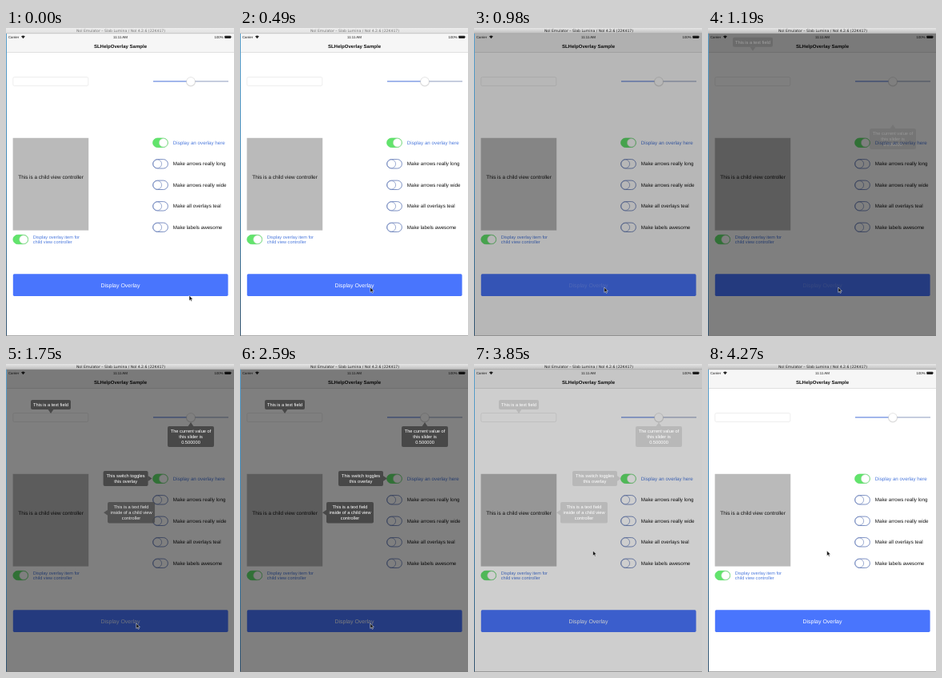
An HTML page for the animation above (4.34 s loop, 285 px wide and 386 px high).

```html
<!DOCTYPE html>
<html lang="en">
<head>
<meta charset="utf-8">
<title>Help overlay demo</title>
<style>
html, body { margin: 0; width: 100%; height: 100%; overflow: hidden; background: #fff; }
svg { display: block; width: 100vw; height: 100vh; }
text { font-family: "Liberation Sans", Arial, sans-serif; text-rendering: geometricPrecision; }
</style>
</head>
<body>
<svg id="stage" viewBox="0 0 285 386">
  <defs>
    <linearGradient id="bar" x2="0" y2="1">
      <stop offset="0" stop-color="#e6e6e6"/><stop offset="1" stop-color="#bdbdbd"/>
    </linearGradient>
    <linearGradient id="desk" x2="0" y2="1">
      <stop offset="0" stop-color="#5aa0cc"/><stop offset=".5" stop-color="#3f86b4"/><stop offset="1" stop-color="#33536e"/>
    </linearGradient>
  </defs>
  <g id="screen"></g>
  <g id="overlay"><rect x="1" y="7" width="284" height="379" opacity=".5"/></g>
  <g id="chrome"></g>
  <path id="cursor" d="M0 0V6.4L1.5 5.1L2.5 7.3L3.6 6.8L2.6 4.7L4.5 4.6Z" fill="#111" stroke="#fff" stroke-width=".5"/>
</svg>
<script>
const LOOP = 4340, STEP = 70;
const $ = id => document.getElementById(id);
const screen = $('screen'), overlay = $('overlay'), chrome = $('chrome');

function add(parent, tag, attrs, content) {
  const el = document.createElementNS('http://www.w3.org/2000/svg', tag);
  for (const k in attrs) el.setAttribute(k, attrs[k]);
  if (content) el.textContent = content;
  return parent.appendChild(el);
}
const rect = (p, x, y, width, height, fill, more) => add(p, 'rect', { x, y, width, height, fill, ...more });
const text = (p, s, x, y, size, fill, anchor = 'start', more) =>
  add(p, 'text', { x, y, 'font-size': size, fill, 'text-anchor': anchor, ...more }, s);

function toggle(x, y, on) {
  const g = add(screen, 'g', { transform: `translate(${x} ${y})` });
  const edge = on ? '#58dc66' : '#5b74b4';
  rect(g, -9.4, -5.7, 18.8, 11.4, on ? '#62e46c' : '#fff', { rx: 5.7, stroke: edge, 'stroke-width': .8 });
  add(g, 'circle', { cx: on ? 3.7 : -3.7, r: 5.3, fill: '#fff', stroke: on ? '#b5d8b8' : edge, 'stroke-width': .6 });
}

// Static app screen
rect(screen, 0, 0, 285, 386, '#fff');
rect(screen, 0, 7, 285, 23.4, '#f6f6f6');
rect(screen, 0, 30.2, 285, .5, '#c4c4c4');
text(screen, 'Carrier', 3, 12.9, 4.3, '#111');
add(screen, 'path', { d: 'M19 10.6Q21.4 8.4 23.8 10.6L21.4 13.2Z', fill: '#222' });
text(screen, '11:11 AM', 143, 13, 4.4, '#111', 'middle');
text(screen, '100%', 271.5, 12.9, 4.3, '#111', 'end');
rect(screen, 273.3, 9.7, 7.8, 3.2, '#222', { rx: .6 });
rect(screen, 281.5, 10.7, .6, 1.2, '#222');
text(screen, 'SLHelpOverlay Sample', 143, 24.8, 6.05, '#111', 'middle', { 'font-weight': 'bold' });

rect(screen, 8.8, 61.5, 94, 11, '#fff', { rx: 1.8, stroke: '#ddd', 'stroke-width': .5 });

rect(screen, 184, 66.4, 47, 1, '#4870d8');
rect(screen, 231, 66.4, 47, 1, '#8e9cbe');
add(screen, 'circle', { cx: 231, cy: 67.7, r: 5.9, fill: '#000', opacity: .12 });
add(screen, 'circle', { cx: 231, cy: 67, r: 5.4, fill: '#fff', stroke: '#ccc', 'stroke-width': .5 });

rect(screen, 8.6, 137.8, 94.6, 115.8, '#bababa');
text(screen, 'This is a child view controller', 56, 189, 6.42, '#111', 'middle');
toggle(18.3, 265, true);
text(screen, 'Display overlay item for', 33.8, 264, 5.6, '#4a78dc');
text(screen, 'child view controller', 33.8, 270.4, 5.6, '#4a78dc');

['Display an overlay here', 'Make arrows really long', 'Make arrows really wide',
  'Make all overlays teal', 'Make labels awesome'].forEach((s, i) => {
  const y = 143.8 + i * 26.5;
  toggle(193, y, !i);
  text(screen, s, 208.8, y + 2, 6.22, i ? '#111' : '#4a78dc');
});

rect(screen, 8.8, 308.3, 268.8, 27.6, '#4975fd', { rx: 1.6 });
const caption = text(screen, 'Display Overlay', 143, 324.7, 7, '#fff', 'middle');

// Window frame
rect(chrome, 0, 0, 285, 7, 'url(#bar)');
rect(chrome, 0, 6.6, 285, .5, '#999');
rect(chrome, 0, 7, 1, 379, 'url(#desk)');
rect(chrome, 0, 385.4, 285, .6, '#777');
const idle = rect(chrome, 0, 0, 285, 6.6, '#f0f0f0', { opacity: .7 });
const heading = text(chrome, 'Nol Emulator – Slab Lumina / Nol 4.2.6 (22K417)', 143.5, 4.9, 4.6, '#222', 'middle',
  { style: 'font-family:"DejaVu Sans",sans-serif' });

// Callouts: box, arrow (base a, tip, base b), lines, slide-in start and offset
const callouts = [
  { box: [31, 45, 50, 12], arrow: '52.5 56.8 56 62 59.5 56.8', lines: ['This is a text field'], start: 1090, dx: 0, dy: -37 },
  { box: [202, 78, 58, 26], arrow: '227.5 78.2 231 73 234.5 78.2', lines: ['The current value of', 'this slider is', '0.500000'], start: 1130, dx: 0, dy: 50 },
  { box: [123, 134, 56, 19], arrow: '178.8 140 184 143.5 178.8 147', lines: ['This switch toggles', 'this overlay'], start: 1300, dx: -50, dy: 0 },
  { box: [108, 173, 59, 26.4], arrow: '108.2 182.7 103 186.2 108.2 189.7', lines: ['This is a text field', 'inside of a child view', 'controller'], start: 1460, dx: 50, dy: 0 }
];
for (const c of callouts) {
  const [x, y, w, h] = c.box;
  c.el = add(overlay, 'g', {});
  rect(c.el, x, y, w, h, '#484848', { rx: 2 });
  add(c.el, 'polygon', { points: c.arrow, fill: '#484848' });
  c.lines.forEach((s, i) =>
    text(c.el, s, x + w / 2, y + h / 2 + 2 + (i - (c.lines.length - 1) / 2) * 6.8, 5.7, '#fff', 'middle'));
}

// Value at time t from [time, value] pairs
function track(keys, t) {
  if (t <= keys[0][0]) return keys[0][1];
  for (let i = 1; i < keys.length; i++) {
    const [t0, a] = keys[i - 1], [t1, b] = keys[i];
    if (t < t1) return a + (b - a) * (t - t0) / (t1 - t0);
  }
  return keys[keys.length - 1][1];
}
const clamp = v => Math.min(1, Math.max(0, v));
const ease = v => v * v * (3 - 2 * v);

const shade = [[770, 0], [840, .14], [980, .56], [1120, .96], [1190, 1], [3640, 1], [3710, .8], [3850, .38], [3990, .13], [4200, 0]];
const captionFade = [[560, 1], [630, .5], [770, .2], [1190, .2], [1890, 1]];
const pointer = [[229, 335.3], [162.8, 325], [148.6, 234]];

function draw(t) {
  overlay.setAttribute('opacity', track(shade, t));
  caption.setAttribute('opacity', track(captionFade, t));
  idle.setAttribute('visibility', t < 630 ? 'visible' : 'hidden');
  heading.setAttribute('fill', t < 630 ? '#777' : '#222');

  for (const c of callouts) {
    const p = clamp((t - c.start) / 500), left = 1 - ease(p);
    c.el.setAttribute('transform', `translate(${c.dx * left} ${c.dy * left})`);
    c.el.setAttribute('opacity', clamp(p * 1.4));
  }

  const a = ease(clamp(t / 490)), b = ease(clamp((t - 2870) / 350));
  const [x, y] = [0, 1].map(i =>
    pointer[0][i] + (pointer[1][i] - pointer[0][i]) * a + (pointer[2][i] - pointer[1][i]) * b);
  $('cursor').setAttribute('transform', `translate(${x} ${y})`);
}

const begin = performance.now();
function tick() {
  const t = (performance.now() - begin) % LOOP;
  draw(Math.floor(t / STEP) * STEP);
  requestAnimationFrame(tick);
}
tick();
</script>
</body>
</html>
```
